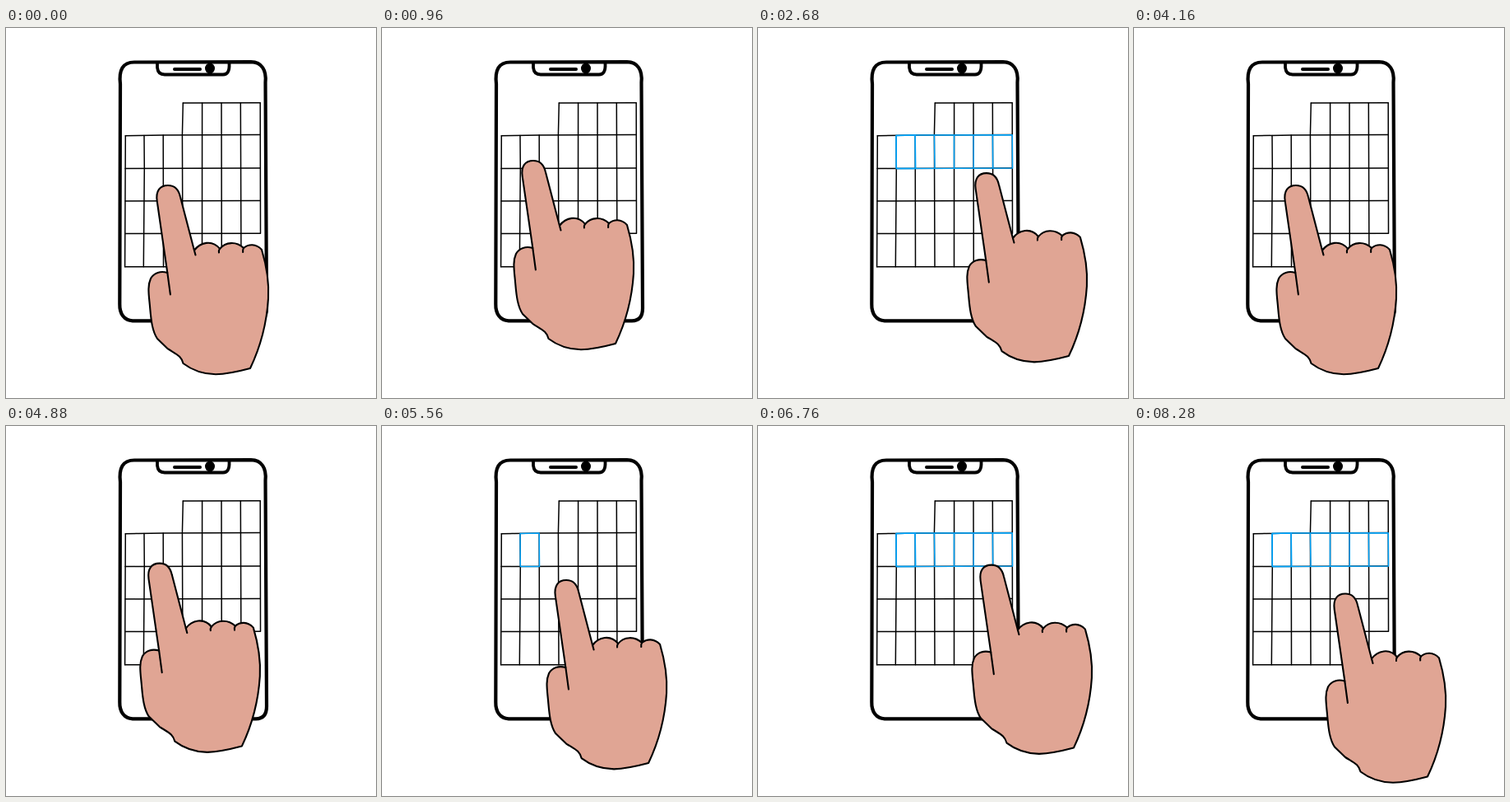
Recreate the animation shown at these times as an HTML page. Size 450x449 px, loop 8320 ms.

```html
<!DOCTYPE html>
<html lang="en">
<head>
<meta charset="utf-8">
<title>Selecting a range on a phone</title>
<style>
  html, body { margin: 0; width: 100%; height: 100%; overflow: hidden; background: #fff; }
  svg { display: block; width: 100%; height: 100%; }
  path { fill: none; stroke: #000; stroke-linecap: round; stroke-linejoin: round; }
  #grid path { stroke-width: 1.5; }
  #grid .picked { stroke: #00a2f8; visibility: hidden; }
  #hand path { stroke-width: 2.1; }
  #hand .skin { fill: #e0a594; }
</style>
</head>
<body>
<svg viewBox="0 0 450 449">
  <g id="phone">
    <path stroke-width="4.2" d="M139 68C137 51 142 41.5 156 41.5L298 41.2C311 41.5 317 51 315.5 66L317 340C317 350 313 355.3 304 355.3L154 355.3C144 355 138 347 138.3 335Z"/>
    <path stroke-width="3.8" d="M184 43V48C184.500 53 187 56.500 193 56.500H264C269 56.500 272 53 271.500 43"/>
    <path stroke-width="4" d="M205 50H236"/>
    <ellipse cx="248" cy="49" rx="6" ry="6.500"/>
  </g>
  <g id="grid">
    <path d="M215.300 91L309 90.700M145.300 130.800L191.500 130L309 129.500M145 170.500L309 170M145 210L309 209.500M145 249.500L309 249.300M144.600 289.700L286 289.700"/>
    <path d="M145.300 130.800L144.600 289.700M168 130.500L168.300 170.500L167.300 289.700M191.200 130L191.500 289.700M215.300 91L214.400 129.700L215 289.700M238.600 91L238.500 289.700M262 91L262.300 289.700M285.300 91L286 289.700M309.200 90.700L309.500 249.300"/>
    <path class="picked" id="cell" d="M168 130.500L191.200 130L191.500 170.500H168.300Z"/>
    <path class="picked" id="row" d="M168 130.500L191.500 130L309.200 129.700L309.500 170L168.300 170.500ZM191.200 130L191.500 170.500M214.400 130L215 170M238.500 130V170M262 130L262.300 170M285.400 130L285.700 170"/>
  </g>
  <g id="hand">
    <path class="skin" d="M196.300 297L183.700 210C182 198 187 191 197 191C205 191 210 196 212 205L229 270C236 260 251 256.500 260 268C267 259.500 280 258.500 289 267C295 262 304 261.500 311 269C317 289 320 310 319 328C317 360 309 388 297 413C282 417 268 420 255 420.300C241 420 226 415 215.500 407C213 398 209 397 197 389.500L184 377C178 368 176.500 355 175.300 341C174 325 171.500 314 176 304C180 297 188 294.500 196.300 297Z"/>
    <path d="M196.300 297L199.900 323.500M229 270L230.500 275.500M260 268Q258.500 270 259 272.500M289 267Q287.700 269 288.200 272"/>
  </g>
</svg>
<script>
const PERIOD = 4160, FIRST_TAP = 1050, SECOND_TAP = 2320;

// Hand offsets: [time in ms, x, y]
const keys = [
  [0, 0, 0], [840, -11.7, -27.6], [960, -13, -30], [FIRST_TAP, -15, -34],
  [1240, 12, -12], [1400, 27, -4], [1680, 47, 11], [1780, 55, 12.5],
  [2120, 89, -28], [SECOND_TAP, 100, -39], [2520, 93, -30], [2600, 87, -22.5],
  [2680, 81, -15], [2960, 67, 4], [3320, 60, 12.5], [PERIOD, 60, 12.5]
];

const slope = (i, axis) =>
  (keys[i + 1][axis] - keys[i][axis]) / (keys[i + 1][0] - keys[i][0]);

// Tangent that keeps the curve from overshooting its keys
function tangent(i, axis) {
  if (i === 0) return slope(0, axis);
  if (i === keys.length - 1) return 0;
  const a = slope(i - 1, axis), b = slope(i, axis);
  return a * b > 0 ? 2 * a * b / (a + b) : 0;
}

function handOffset(t, axis) {
  const i = keys.findIndex((key, n) => n < keys.length - 1 && t < keys[n + 1][0]);
  const [a, b] = [keys[i], keys[i + 1]];
  const span = b[0] - a[0], u = (t - a[0]) / span, v = 1 - u;
  return a[axis] * v * v * (1 + 2 * u) + b[axis] * u * u * (3 - 2 * u)
    + span * u * v * (tangent(i, axis) * v - tangent(i + 1, axis) * u);
}

const [hand, cell, row] = ["hand", "cell", "row"].map(id => document.getElementById(id));
const show = (element, on) => element.style.visibility = on ? "visible" : "hidden";
const start = performance.now();

function draw() {
  const t = Math.max(0, performance.now() - start) % PERIOD;
  hand.setAttribute("transform", `translate(${handOffset(t, 1)} ${handOffset(t, 2)})`);
  show(cell, t >= FIRST_TAP);
  show(row, t >= SECOND_TAP);
  requestAnimationFrame(draw);
}
draw();
</script>
</body>
</html>
```
